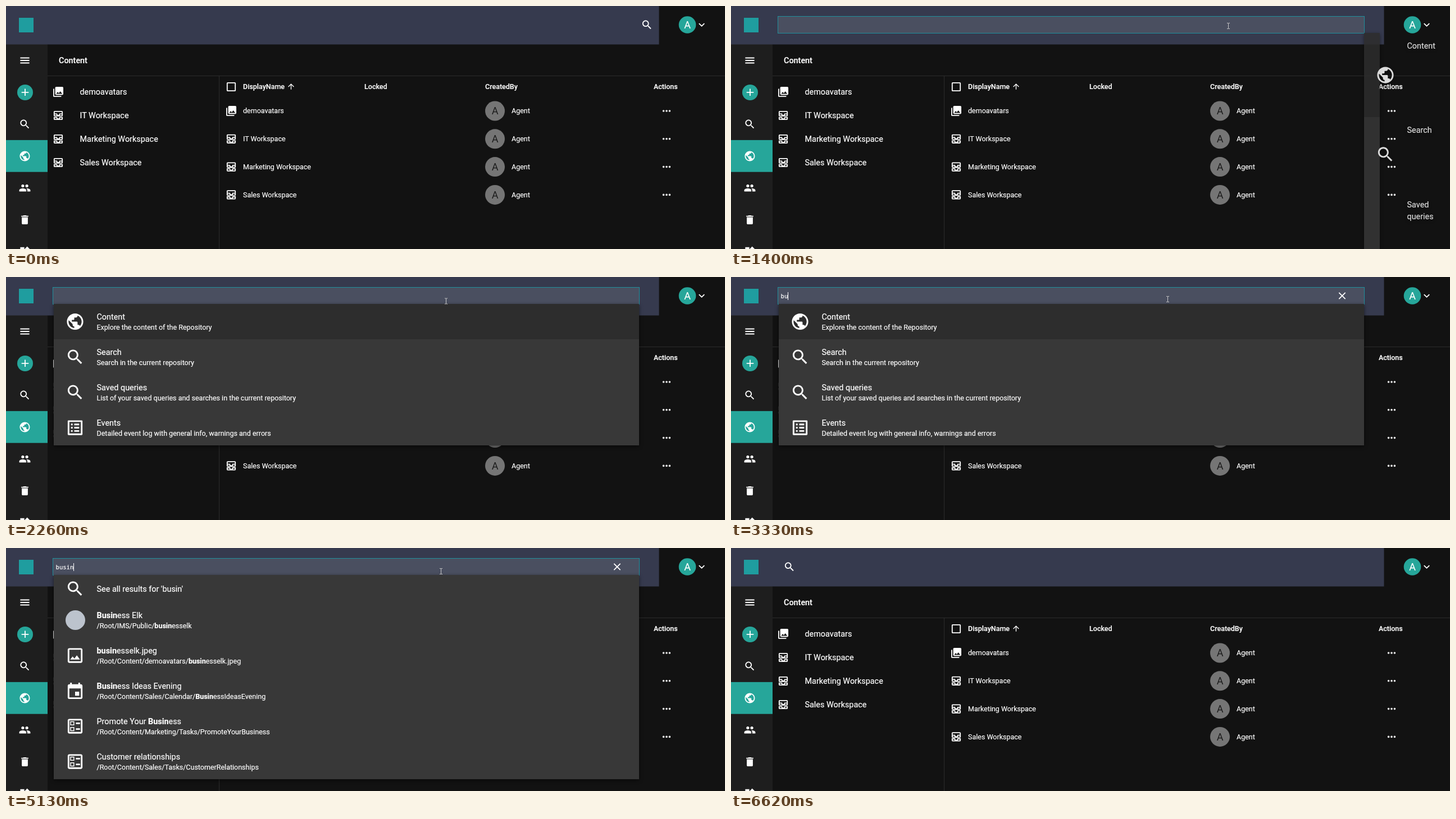
Write an HTML page that moves like this. It is 1280 px wide and 433 px high and loops after 6.71 s.

```html
<!DOCTYPE html>
<html lang="en">
<head>
<meta charset="utf-8">
<title>Content search</title>
<style>
html, body { margin: 0; width: 100%; height: 100%; overflow: hidden; background: #121212; }
svg { display: block; width: 100%; height: 100%; }
text { font-family: Roboto, sans-serif; fill: #fff; stroke: #fff; stroke-width: .2; white-space: pre; }
.initial { fill: #1a1a1a; stroke: none; }
.typed { font-family: 'DejaVu Sans Mono', monospace; }
#popup { filter: drop-shadow(0 2px 3px #0008); }
</style>
</head>
<body>
<svg viewBox="0 0 1280 433">
  <g id="page"></g>
  <g id="live"></g>
  <g id="popup"></g>
  <g id="pointer"></g>
</svg>
<script>
const LOOP = 6710, TEAL = '#26a69a', RIGHT = 1127, SMALL = 12.5;

const ICONS = {
  search: 'M15.5 14h-.79l-.28-.27C15.41 12.59 16 11.11 16 9.5 16 5.91 13.09 3 9.5 3S3 5.91 3 9.5 5.91 16 9.5 16c1.61 0 3.09-.59 4.23-1.57l.27.28v.79l5 4.99L20.49 19l-4.99-5zm-6 0C7.01 14 5 11.99 5 9.5S7.01 5 9.5 5 14 7.01 14 9.5 11.99 14 9.5 14z',
  menu: 'M3 18h18v-2H3v2zm0-5h18v-2H3v2zm0-7v2h18V6H3z',
  add: 'M19 13h-6v6h-2v-6H5v-2h6V5h2v6h6v2z',
  globe: 'M12 2C6.48 2 2 6.48 2 12s4.48 10 10 10 10-4.48 10-10S17.52 2 12 2zm-1 17.93c-3.95-.49-7-3.85-7-7.93 0-.62.08-1.21.21-1.79L9 15v1c0 1.1.9 2 2 2v1.93zm6.9-2.54c-.26-.81-1-1.39-1.9-1.39h-1v-3c0-.55-.45-1-1-1H8v-2h2c.55 0 1-.45 1-1V7h2c1.1 0 2-.9 2-2v-.41c2.93 1.19 5 4.06 5 7.41 0 2.08-.8 3.97-2.1 5.39z',
  people: 'M16 11c1.66 0 2.99-1.34 2.99-3S17.66 5 16 5c-1.66 0-3 1.34-3 3s1.34 3 3 3zm-8 0c1.66 0 2.99-1.34 2.99-3S9.66 5 8 5C6.34 5 5 6.34 5 8s1.34 3 3 3zm0 2c-2.33 0-7 1.17-7 3.5V19h14v-2.5c0-2.33-4.67-3.5-7-3.5zm8 0c-.29 0-.62.02-.97.05 1.16.84 1.97 1.97 1.97 3.45V19h6v-2.5c0-2.33-4.67-3.5-7-3.5z',
  trash: 'M6 19c0 1.1.9 2 2 2h8c1.1 0 2-.9 2-2V7H6v12zM19 4h-3.5l-1-1h-5l-1 1H5v2h14V4z',
  widgets: 'M13 13v8h8v-8h-8zM3 21h8v-8H3v8zM3 3v8h8V3H3zm13.66-1.31L11 7.34 16.66 13l5.66-5.66-5.66-5.65z',
  photos: 'M22 16V4c0-1.1-.9-2-2-2H8c-1.1 0-2 .9-2 2v12c0 1.1.9 2 2 2h12c1.1 0 2-.9 2-2zm-11-4l2.03 2.71L16 11l4 5H8l3-4zM2 6v14c0 1.1.9 2 2 2h14v-2H4V6H2z',
  inbox: 'M19 3H5c-1.1 0-2 .9-2 2v7c0 1.1.9 2 2 2h14c1.1 0 2-.9 2-2V5c0-1.1-.9-2-2-2zM5 10h3.13c.21.78.67 1.47 1.27 2H5v-2zm14 2h-4.4c.6-.53 1.06-1.22 1.27-2H19v2zm0-4h-5v1c0 1.07-.93 2-2 2s-2-.93-2-2V8H5V5h14v3zm-5 7v1c0 .47-.19.9-.48 1.25-.37.45-.92.75-1.52.75s-1.15-.3-1.52-.75c-.29-.35-.48-.78-.48-1.25v-1H3v4c0 1.1.9 2 2 2h14c1.1 0 2-.9 2-2v-4h-7zm-9 2h3.13c.02.09.06.17.09.25.24.68.65 1.28 1.18 1.75H5v-2zm14 2h-4.4c.54-.47.95-1.07 1.18-1.75.03-.08.07-.16.09-.25H19v2z',
  list: 'M19 5v14H5V5h14m1.1-2H3.9c-.5 0-.9.4-.9.9v16.2c0 .4.4.9.9.9h16.2c.4 0 .9-.5.9-.9V3.9c0-.5-.5-.9-.9-.9zM11 7h6v2h-6V7zm0 4h6v2h-6v-2zm0 4h6v2h-6zM7 7h2v2H7zm0 4h2v2H7zm0 4h2v2H7z',
  image: 'M19 5v14H5V5h14m0-2H5c-1.1 0-2 .9-2 2v14c0 1.1.9 2 2 2h14c1.1 0 2-.9 2-2V5c0-1.1-.9-2-2-2zm-4.86 8.86l-3 3.87L9 13.14 6 17h12l-3.86-5.14z',
  event: 'M17 13h-5v5h5v-5zM16 2v2H8V2H6v2H5c-1.11 0-1.99.9-1.99 2L3 20c0 1.1.89 2 2 2h14c1.1 0 2-.9 2-2V6c0-1.1-.9-2-2-2h-1V2h-2zm3 18H5V9h14v11z',
  task: 'M13 7.5h5v2h-5zm0 7h5v2h-5zM19 3H5c-1.1 0-2 .9-2 2v14c0 1.1.9 2 2 2h14c1.1 0 2-.9 2-2V5c0-1.1-.9-2-2-2zm0 16H5V5h14v14zM11 6H6v5h5V6zm-1 4H7V7h3v3zm1 3H6v5h5v-5zm-1 4H7v-3h3v3z',
  box: 'M19 5v14H5V5h14m0-2H5c-1.1 0-2 .9-2 2v14c0 1.1.9 2 2 2h14c1.1 0 2-.9 2-2V5c0-1.1-.9-2-2-2z',
  up: 'M4 12l1.41 1.41L11 7.83V20h2V7.83l5.58 5.59L20 12l-8-8-8 8z',
  down: 'M16.59 8.59L12 13.17 7.41 8.59 6 10l6 6 6-6z',
  dots: 'M4 12a2 2 0 1 0 4 0a2 2 0 1 0-4 0zm6 0a2 2 0 1 0 4 0a2 2 0 1 0-4 0zm6 0a2 2 0 1 0 4 0a2 2 0 1 0-4 0z',
  close: 'M19 6.41L17.59 5 12 10.59 6.41 5 5 6.41 10.59 12 5 17.59 6.41 19 12 13.41 17.59 19 19 17.59 13.41 12z'
};

const $ = id => document.getElementById(id);
const rect = (x, y, w, h, fill, more = '') =>
  `<rect x="${x}" y="${y}" width="${w}" height="${h}" fill="${fill}" ${more}/>`;
const disc = (x, y, r, fill) => `<circle cx="${x}" cy="${y}" r="${r}" fill="${fill}"/>`;
const icon = (name, x, y, size = 21.6) =>
  `<path fill="#fff" d="${ICONS[name]}" transform="translate(${x} ${y}) scale(${size / 24}) translate(-12 -12)"/>`;
// y is the middle of the capitals; baselines sit on whole pixels
const text = (str, x, y, size = 14.4, more = '') =>
  `<text x="${x}" y="${Math.round(y + size * .355)}" font-size="${size}" ${more}>${str}</text>`;

const FOLDERS = ['demoavatars', 'IT Workspace', 'Marketing Workspace', 'Sales Workspace'];
const COMMANDS = [
  ['globe', 'Content', 'Explore the content of the Repository'],
  ['search', 'Search', 'Search in the current repository'],
  ['search', 'Saved queries', 'List of your saved queries and searches in the current repository'],
  ['list', 'Events', 'Detailed event log with general info, warnings and errors']
];
// * marks where the match starts
const RESULTS = [
  ['', '*Business Elk', '/Root/IMS/Public/*businesselk'],
  ['image', '*businesselk.jpeg', '/Root/Content/demoavatars/*businesselk.jpeg'],
  ['event', '*Business Ideas Evening', '/Root/Content/Sales/Calendar/*BusinessIdeasEvening'],
  ['task', 'Promote Your *Business', '/Root/Content/Marketing/Tasks/PromoteYourBusiness'],
  ['task', 'Customer relationships', '/Root/Content/Sales/Tasks/CustomerRelationships']
];

function drawPage() {
  const medium = 'font-weight="500"', centred = 'text-anchor="middle"';
  let s = rect(0, 0, 1280, 433, '#121212') + rect(0, 68, 74, 365, '#1e1e1e')
    + rect(0, 0, 1162.5, 68.5, '#363a4e') + rect(23, 21, 26, 26, '#1f9d9f')
    + disc(1213, 33.5, 15.3, TEAL) + text('A', 1213, 33.5, 18, centred) + icon('down', 1238.5, 33.5)
    + rect(0, 238.9, 74, 56.8, TEAL) + disc(34, 154, 14, TEAL)
    + rect(74, 124, 1206, 1, '#2c2c2c') + rect(379, 125, 1, 308, '#2c2c2c')
    + text('Content', 94, 97, 14.4, medium);
  ['menu', 'add', 'search', 'globe', 'people', 'trash', 'widgets'].forEach((name, i) =>
    s += icon(name, name === 'add' ? 34 : 33.5, 97 + 56.8 * i));
  s += icon('box', 401, 144) + icon('up', 507.5, 143.5, 16);
  [['DisplayName', 422], ['Locked', 638], ['CreatedBy', 853], ['Actions', 1153]].forEach(([name, x]) =>
    s += text(name, x, 144, SMALL, medium));
  FOLDERS.forEach((name, i) => {
    const y = 187 + 49.8 * i, kind = i ? 'inbox' : 'photos';
    s += icon(kind, 93, 153 + 42 * i) + text(name, 131.5, 153 + 42 * i)
      + icon(kind, 401, y) + text(name, 422, y, SMALL)
      + disc(870.5, y, 17.5, '#757575') + text('A', 870.5, y, 18, centred + ' class="initial"')
      + text('Agent', 900, y, SMALL) + icon('dots', 1176, y);
  });
  $('page').innerHTML = s;
}

function mark(str, n) {
  const at = str.indexOf('*');
  if (at < 0) return str;
  const rest = str.slice(at + 1);
  return `${str.slice(0, at)}<tspan font-weight="700">${rest.slice(0, n)}</tspan>${rest.slice(n)}`;
}

// Before the list gets its width, each word sits on a line of its own
function drawNarrow(x) {
  let s = rect(x, 48, 28, 385, '#383838') + rect(x, 48, 28, 150, '#2d2d2d'), y = 48;
  COMMANDS.slice(0, 3).forEach(([name, title, info]) => {
    const h = 46 + 17.35 * info.split(' ').length;
    s += icon(name, x + 38, y + h / 2, 35);
    title.split(' ').forEach((word, i) => s += text(word, x + 76.5, y + 23 + 21 * i));
    y += h;
  });
  return s;
}

function drawList(x, found) {
  const rows = found ? RESULTS : COMMANDS, first = found ? 49 : 0, w = RIGHT - x;
  let s = rect(x, 48, w, first + 63 * rows.length, '#383838');
  if (found.length < 5) s += rect(x, 48, w, first || 63, '#2d2d2d');
  if (found) s += icon('search', x + 38, 72.5, 35) + text(`See all results for '${found}'`, x + 76.5, 73);
  rows.forEach(([name, title, info], i) => {
    const y = 48 + first + 63 * i;
    s += (name ? icon(name, x + 38, y + 31.5, 35) : disc(x + 38.5, y + 31.5, 17.5, '#bcc3cd'))
      + text(mark(title, found.length), x + 76.5, y + 23)
      + text(mark(info, found.length), x + 76.5, y + 42, SMALL);
  });
  return s;
}

const POINTER = [
  [290, 1203, 312], [370, 1202, 300], [460, 1198, 262], [540, 1190, 200], [620, 1180, 135],
  [700, 1168, 80], [790, 1157, 40], [870, 1149, 16], [950, 1145, 24], [990, 1145, 26],
  [1070, 1120, 29], [1150, 1070, 31], [1230, 1010, 32], [1310, 950, 33], [1400, 885.5, 35.5],
  [1480, 838, 38], [1550, 801.5, 39.5], [1640, 789, 41], [1720, 782.5, 42], [2090, 777.5, 40],
  [2260, 783.5, 43], [2330, 780.5, 41], [2400, 777.5, 39.5], [5130, 774.5, 41.5]
];
const ARROW = '<path d="M0 0v16l3.7-3.5 2.6 6 2.6-1.1-2.6-5.8h5z" fill="#fff" stroke="#000"/>';
const BEAM = '<path d="M-2.5-5h2L0-4.5.5-5h2M0-4.5V4.5M-2.5 5h2L0 4.5.5 5h2" fill="none" stroke="#c8c8c8"/>';
const KEYS = [3030, 3330, 3480, 3650, 3800];
const FOUND = [[3480, 'bu'], [3650, 'bus'], [3800, 'busi'], [3890, 'busin']];
const CARET = [1480, 1860, 2330, 2860, 3030, 4200, 4750, 5280, 5830, 6390];

function draw(t) {
  const spot = POINTER.filter(p => p[0] <= t).pop();
  const now = t < 1800 && spot ? spot[0] : t;
  const open = t >= 990 && t < 6620;
  const typed = 'busin'.slice(0, KEYS.filter(k => k <= t).length);
  const shift = now < 1400 ? 1042 : now < 1720 ? 1042 * Math.exp((1400 - now) / 37.5) : 0;

  let s = '';
  if (open) {
    const grow = Math.min(1, (now - 990) / 320), left = RIGHT - 1044 * (1 - (1 - grow) ** 3);
    if (grow) s += rect(left + .5, 18.5, RIGHT - left, 30, '#4a4f60', 'stroke="#1f8f9c"');
    s += text(typed, 88.6, 34, 10.5, 'class="typed"');
    if (typed) s += icon('close', 1088, 33.5);
    if (CARET.filter(c => c <= t).length % 2)
      s += rect(Math.floor(89 + shift + 6.3 * typed.length), 27, 1, 14, '#fff');
  } else s += icon('search', t < 990 ? 1141 : 104, 33.5);
  $('live').innerHTML = s;

  const found = (FOUND.filter(f => f[0] <= t).pop() || [0, ''])[1];
  const x = 85 + shift;
  $('popup').setAttribute('opacity', Math.min(1, Math.max(0, (now - 1200) / 235)));
  $('popup').innerHTML = !open || now < 1310 ? '' : now < 1480 ? drawNarrow(x) : drawList(x, found);

  $('pointer').innerHTML = spot && t < 6000
    ? `<g transform="translate(${spot[1]} ${spot[2]})">${t < 1070 ? ARROW : BEAM}</g>` : '';
}

drawPage();
const start = performance.now();
(function tick() {
  draw((performance.now() - start) % LOOP);
  requestAnimationFrame(tick);
})();
</script>
</body>
</html>
```
